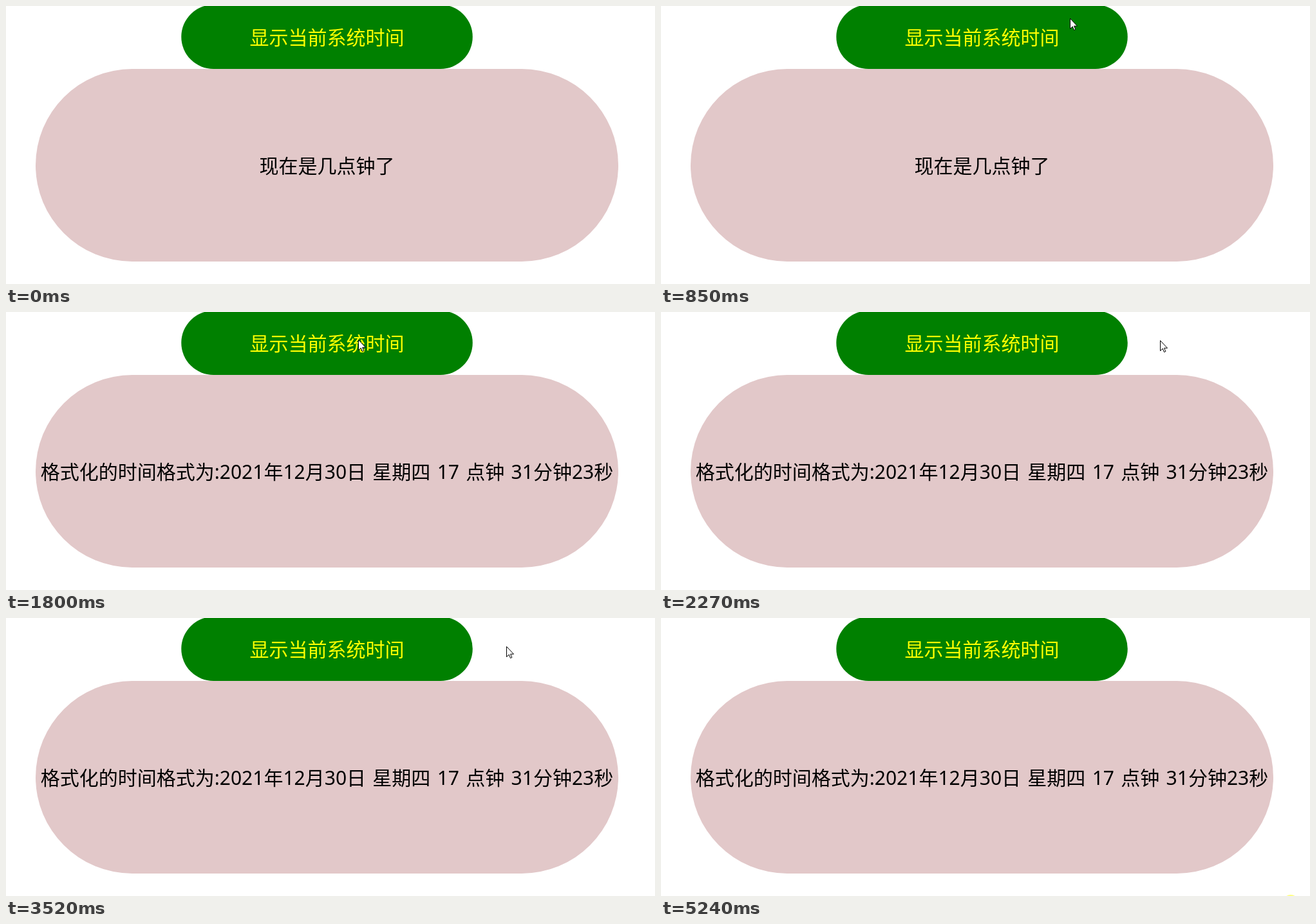
Write an HTML page that moves like this. It is 1008 px wide and 433 px high and loops after 5330 ms.

```html
<!DOCTYPE html>
<html lang="zh-CN">
<head>
<meta charset="utf-8">
<title>显示当前系统时间</title>
<style>
  html, body { margin: 0; height: 100%; overflow: hidden; background: #fff; }
  svg { display: block; }
  text { font: 30px "Noto Sans", "Noto Sans CJK SC", "Noto Sans CJK", sans-serif; text-anchor: middle; word-spacing: 2.5px; }
</style>
</head>
<body>
<svg width="1008" height="433">
  <rect x="272.25" y="-2" width="452.5" height="100" rx="50" fill="green"/>
  <rect x="46" y="98" width="905" height="300" rx="150" fill="#e2c8c9"/>
  <text x="498.5" y="60" fill="yellow">显示当前系统时间</text>
  <text id="message" x="498.5" y="260"></text>
  <circle id="halo" r="12" fill="yellow" fill-opacity=".5"/>
  <path id="cursor" d="M.5 .5V16.5L4.2 13 6.5 18.5 8.8 17.5 6.6 12.2H11.5Z" fill="#fff" stroke="#000"/>
</svg>
<script>
const LOOP = 5330;
const QUESTION = "现在是几点钟了";
const ANSWER = "格式化的时间格式为:2021年12月30日 星期四 17 点钟 31分钟23秒";
const [message, halo, cursor] = ["message", "halo", "cursor"].map(id => document.getElementById(id));

const easeOut = u => 1 - (1 - u) ** 2.17;
const easeIn = u => u ** 2.2;
const easeInOut = u => u * u * (3 - 2 * u);
const linear = u => u;

// Pointer moves along quadratic curves, sampled in discrete steps
const curve = (start, end, steps, ease, ...path) => ({ start, end, steps, ease, path });
const rest = (start, ...point) => curve(start, start, 1, linear, point, point, point);
const moves = [
  curve(210, 690, 6, linear, [981, 425], [935, 60], [744, 27]),
  curve(690, 1250, 7, easeOut, [744, 27], [639, 3.5], [534, 42]),
  rest(1330, 534, 43),
  curve(1720, 2270, 7, easeInOut, [534, 43], [654, 43.5], [775, 44]),
  rest(3190, 776, 44),
  rest(3440, 777, 44),
  curve(4440, 4760, 4, easeIn, [777, 44], [762, 230], [966, 415]),
  rest(4840, 978, 443),
];
const clicks = [[1570, 1650], [3190, 3440], [5240, LOOP]];

function pointerAt(t) {
  const move = moves.findLast(m => t >= m.start);
  if (!move) return [-50, -50];
  const { start, end, steps, ease, path: [a, b, c] } = move;
  const u = end > start ? Math.min(1, (t - start) / (end - start)) : 1;
  const p = ease(Math.floor(u * steps + 1e-6) / steps);
  return [0, 1].map(i => Math.round((1 - p) ** 2 * a[i] + 2 * p * (1 - p) * b[i] + p * p * c[i]));
}

function draw(now) {
  const t = now % LOOP;
  const place = `translate(${pointerAt(t)})`;
  const text = t < 1650 ? QUESTION : ANSWER;
  cursor.setAttribute("transform", place);
  halo.setAttribute("transform", place);
  halo.setAttribute("visibility", clicks.some(([on, off]) => t >= on && t < off) ? "visible" : "hidden");
  if (message.textContent !== text) message.textContent = text;
  requestAnimationFrame(draw);
}
draw(performance.now());
</script>
</body>
</html>
```
